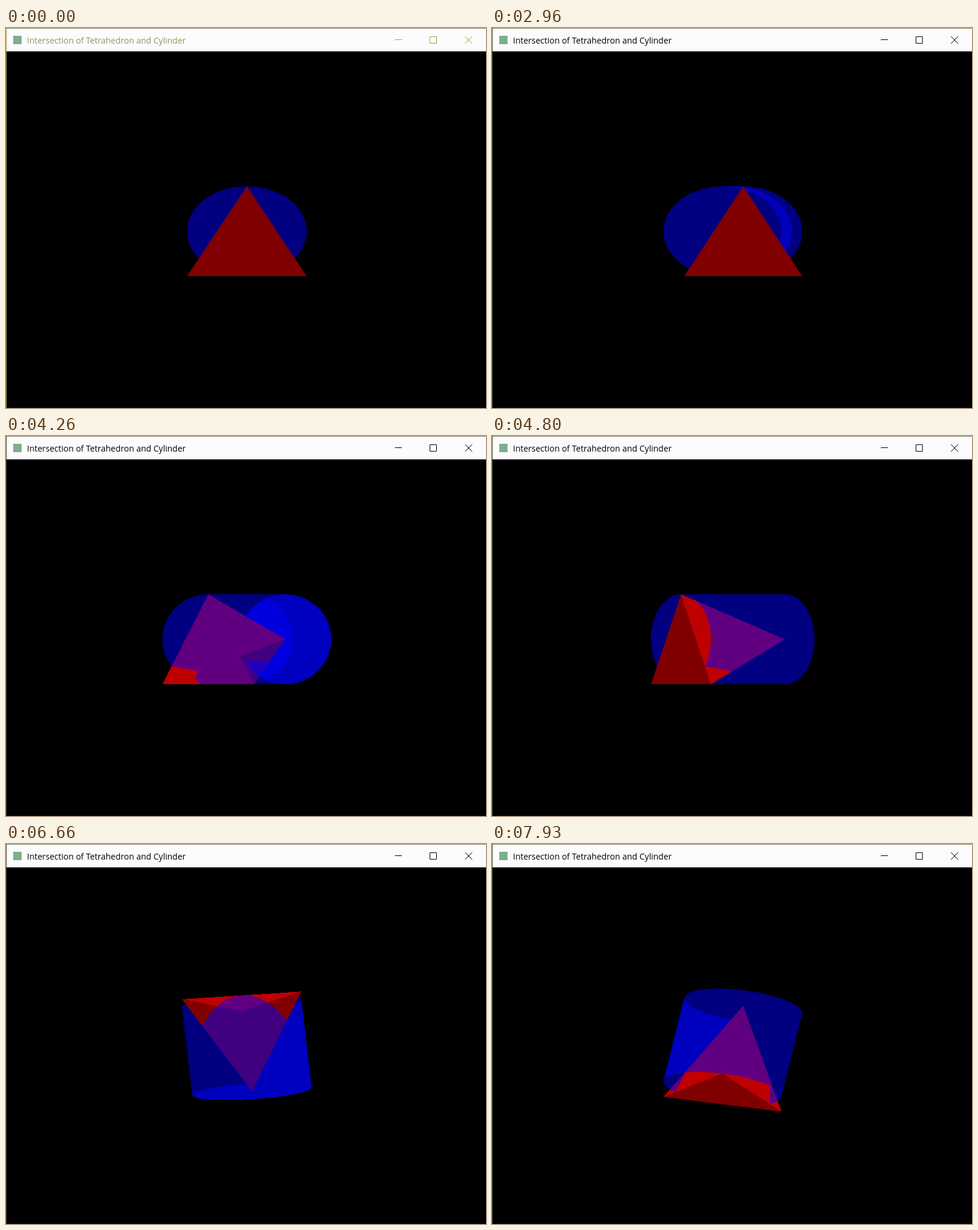
Recreate the animation shown at these times as an HTML page with a canvas. Size 800 px wide and 634 px high, loop 8 s.

```html
<!DOCTYPE html>
<html lang="en">
<head>
<meta charset="utf-8">
<title>Tetrahedron and cylinder</title>
<style>
  html, body { margin: 0; width: 100%; height: 100%; overflow: hidden; background: #000; }
  #stage { position: relative; width: 800px; height: 634px; overflow: hidden; background: #000; }
  #stage > * { position: absolute; left: 0; top: 0; display: block; }
  #stage { --ink: #000; --edge: #4c4a1c; }
  #stage.idle { --ink: #aa9d3c; --edge: #a89b34; }
  #stage.idle text { fill: #98925f; }
  text { font: 14px "Open Sans", "Noto Sans", sans-serif; fill: #000; }
  .buttons { fill: none; stroke: var(--ink); }
  .edge { fill: var(--edge); }
</style>
</head>
<body>
<div id="stage">
  <canvas id="scene" width="800" height="634"></canvas>
  <svg width="800" height="634">
    <rect y="1" width="800" height="38" fill="#fcfcfe"/>
    <rect width="800" height="1" fill="#857f62"/>
    <rect class="edge" width="1" height="634"/>
    <rect x="1" y="632" width="799" height="2" fill="#16000a"/>
    <rect x="12" y="13" width="14" height="14" fill="#7fae8c"/>
    <text x="35" y="26">Intersection of Tetrahedron and Cylinder</text>
    <g class="buttons">
      <path d="M648 19.5H660M706.5 14.5H717.5V25.5H706.5Z"/>
      <path d="M765 14L777 26M777 14L765 26"/>
    </g>
  </svg>
</div>
<script>
const LOOP = 8000, ACTIVE_AT = 2000, STEP = 5, ALPHA = 0.5;
const CENTER = { x: 401.4, y: 339.2 }, SCALE = { x: 99.8, y: 75 };
const BOX = { x: 250, y: 220, w: 304, h: 242 };

// Segments: start time, first angle, time per step, last angle
const YAW = [
  [0, 0], [2460, 5], [2960, 10, 30.8, 220], [4260, 220, 33.3, 355], [7660, 350]
];
const PITCH = [[0, 0], [5630, 5], [6050, 10, 33.3, 290]];

// Faces in drawing order
const A = [0, 1, 1], B = [-1, -1, 1], C = [1, -1, 1], D = [0, 0, -1];
const FACES = [[A, B, C], [D, B, C], [D, A, B], [D, A, C]];

const stage = document.getElementById('stage');
const ctx = document.getElementById('scene').getContext('2d');
const image = ctx.createImageData(BOX.w, BOX.h);

function angleAt(segments, t) {
  const [start, first, interval = Infinity, last = first] =
    segments.filter(s => s[0] <= t).pop();
  return Math.min(last, first + STEP * Math.floor((t - start) / interval));
}

function makeView(yaw, pitch) {
  const rad = Math.PI / 180;
  const cy = Math.cos(yaw * rad), sy = Math.sin(yaw * rad);
  const cp = Math.cos(pitch * rad), sp = Math.sin(pitch * rad);
  return {
    toEye([x, y, z]) {
      const depth = z * cy - x * sy;
      return [x * cy + z * sy, y * cp + depth * sp, depth * cp - y * sp];
    },
    toObject(x, y, z) {
      const depth = y * sp + z * cp;
      return [x * cy - depth * sy, y * cp - z * sp, x * sy + depth * cy];
    }
  };
}

// Returns a function giving the depth of a triangle at (x, y), or null outside
function makeFace([a, b, c]) {
  const ux = b[0] - a[0], uy = b[1] - a[1], vx = c[0] - a[0], vy = c[1] - a[1];
  const area = ux * vy - uy * vx;
  if (Math.abs(area) < 1e-6) return () => null;
  return (x, y) => {
    const px = x - a[0], py = y - a[1];
    const u = (px * vy - py * vx) / area, v = (ux * py - uy * px) / area;
    if (u < 0 || v < 0 || u + v > 1) return null;
    return a[2] + u * (b[2] - a[2]) + v * (c[2] - a[2]);
  };
}

// Depths along a ray in drawing order: wall slices, middle disc, end disc
function cylinderHits(o, d) {
  const hits = [];
  const a = d[0] * d[0] + d[1] * d[1];
  if (a > 1e-9) {
    const b = o[0] * d[0] + o[1] * d[1];
    const disc = b * b - a * (o[0] * o[0] + o[1] * o[1] - 1);
    if (disc >= 0) {
      const wall = [];
      for (const sign of [-1, 1]) {
        const t = (-b + sign * Math.sqrt(disc)) / a;
        if (Math.abs(o[2] + t * d[2]) > 1) continue;
        const turn = Math.atan2(o[0] + t * d[0], o[1] + t * d[1]);
        wall.push({ t, turn: turn < 0 ? turn + 2 * Math.PI : turn });
      }
      wall.sort((p, q) => p.turn - q.turn);
      hits.push(...wall.map(p => p.t));
    }
  }
  if (Math.abs(d[2]) > 1e-6) {
    for (const z of [0, -1]) {
      const t = (z - o[2]) / d[2];
      if (Math.hypot(o[0] + t * d[0], o[1] + t * d[1]) <= 1) hits.push(t);
    }
  }
  return hits;
}

// Blends every surface that passes the depth test, in drawing order
function drawScene(yaw, pitch) {
  const view = makeView(yaw, pitch);
  const faces = FACES.map(f => makeFace(f.map(view.toEye)));
  const ray = view.toObject(0, 0, 1);
  let i = 0;
  for (let row = 0; row < BOX.h; row++) {
    const y = (CENTER.y - BOX.y - row - 0.5) / SCALE.y;
    for (let col = 0; col < BOX.w; col++, i += 4) {
      const x = (BOX.x + col + 0.5 - CENTER.x) / SCALE.x;
      let nearest = -Infinity, red = 0, blue = 0;
      for (const face of faces) {
        const t = face(x, y);
        if (t === null || t <= nearest + 1e-5) continue;
        nearest = t;
        red += (255 - red) * ALPHA;
      }
      for (const t of cylinderHits(view.toObject(x, y, 0), ray)) {
        if (t <= nearest + 1e-5) continue;
        nearest = t;
        red *= 1 - ALPHA;
        blue += (255 - blue) * ALPHA;
      }
      image.data[i] = red;
      image.data[i + 2] = blue;
      image.data[i + 3] = 255;
    }
  }
  ctx.putImageData(image, BOX.x, BOX.y);
}

let shown = '';
function render() {
  const t = performance.now() % LOOP;
  const yaw = angleAt(YAW, t), pitch = angleAt(PITCH, t);
  const pose = yaw + ',' + pitch;
  if (pose !== shown) drawScene(yaw, pitch);
  shown = pose;
  stage.classList.toggle('idle', t < ACTIVE_AT);
  requestAnimationFrame(render);
}
render();
</script>
</body>
</html>
```
